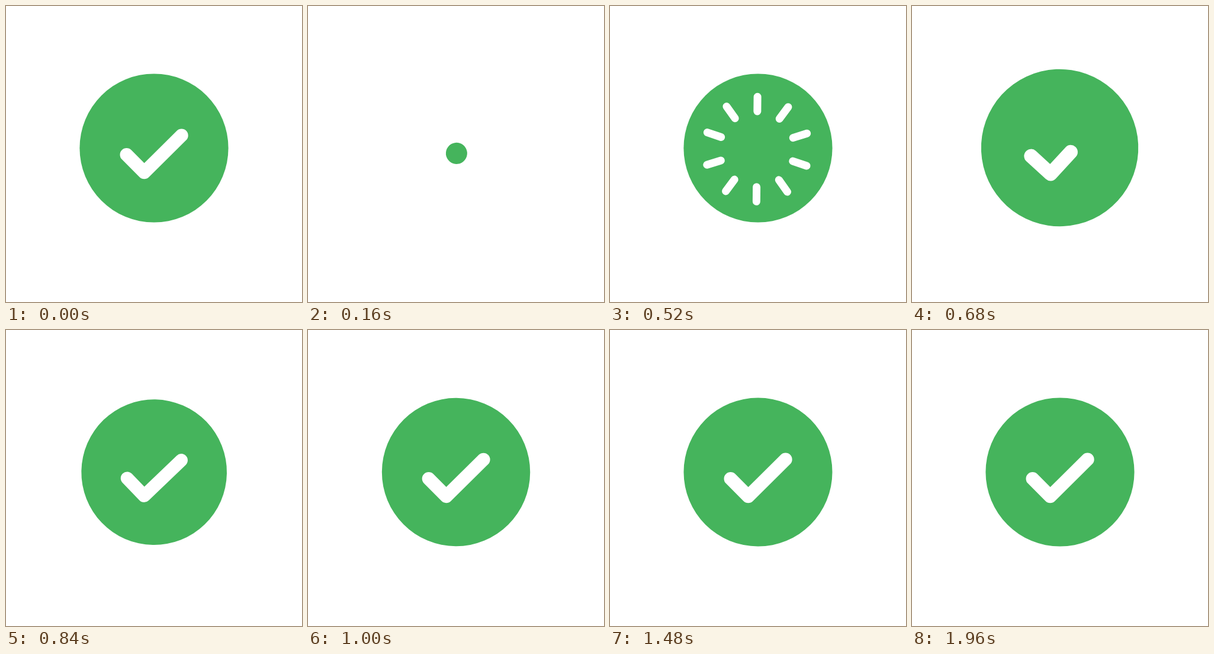
Animation of 500x500 px, one loop 2000 ms. Source, as an HTML page:

```html
<!DOCTYPE html>
<html lang="en">
<head>
<meta charset="utf-8">
<title>Success check</title>
<style>
  html, body { margin: 0; width: 100%; height: 100%; overflow: hidden; background: #fff; }
  svg { display: block; width: 100%; height: 100%; }
  .line { fill: none; stroke: #fff; stroke-linecap: round; stroke-linejoin: round; }
</style>
</head>
<body>
<svg viewBox="0 0 500 500">
  <g id="badge">
    <circle cx="250" cy="240" r="125.6" fill="#45b45c"/>
    <path id="burst" class="line" stroke-width="13" transform="translate(248.25 241.8) rotate(.56)"/>
    <path id="check" class="line" stroke-width="22.4" d="M203.7 251.2L233.5 281.1L296.5 218.6"/>
  </g>
</svg>
<script>
const LOOP = 2000, STEP = 40;
const GROW = [40, 520], DRAW = [546, 760], HEAD = [440, 600], TAIL = [470, 640];
const RAYS = 10, INNER = 48, TRAVEL = 54;

const [badge, burst, check] = ['badge', 'burst', 'check'].map(id => document.getElementById(id));
const checkLength = check.getTotalLength();

const progress = (t, [from, to]) => Math.min(1, Math.max(0, (t - from) / (to - from)));
const smooth = u => u * u * (3 - 2 * u);
const easeOut = u => 1 - (1 - u) ** 2;

// Accelerating growth, then a decaying spring around 1.
function pop(t) {
  if (t < GROW[0]) return 1;
  if (t < GROW[1]) return progress(t, GROW) ** 1.4;
  const s = (t - GROW[1]) / 1000;
  return 1 + 0.14 * Math.sin(4 * Math.PI * s) * Math.exp(-5 * s);
}

function burstPath(t) {
  if (t <= HEAD[0] || t >= TAIL[1]) return '';
  const head = INNER + TRAVEL * easeOut(progress(t, HEAD));
  const tail = INNER + TRAVEL * progress(t, TAIL);
  let d = '';
  for (let i = 0; i < RAYS; i++) {
    const a = i * 2 * Math.PI / RAYS, x = Math.sin(a), y = -Math.cos(a);
    d += `M${x * tail} ${y * tail}L${x * head} ${y * head}`;
  }
  return d;
}

function drawCheck(t) {
  const part = t < GROW[0] ? 1 : smooth(progress(t, DRAW));
  check.style.display = part > 0 ? '' : 'none';
  check.setAttribute('stroke-dasharray', part < 1 ? `${part * checkLength} 1000` : 'none');
}

function render(t) {
  const p = pop(t);
  badge.style.display = p > 0 ? '' : 'none';
  badge.setAttribute('transform',
    `translate(250 250) rotate(${45 * (1 - p)}) scale(${p}) translate(-250 -250)`);
  burst.setAttribute('d', burstPath(t));
  drawCheck(t);
}

const start = performance.now();
function tick() {
  const t = (performance.now() - start) % LOOP;
  render(Math.floor(t / STEP) * STEP);
  requestAnimationFrame(tick);
}
tick();
</script>
</body>
</html>
```
